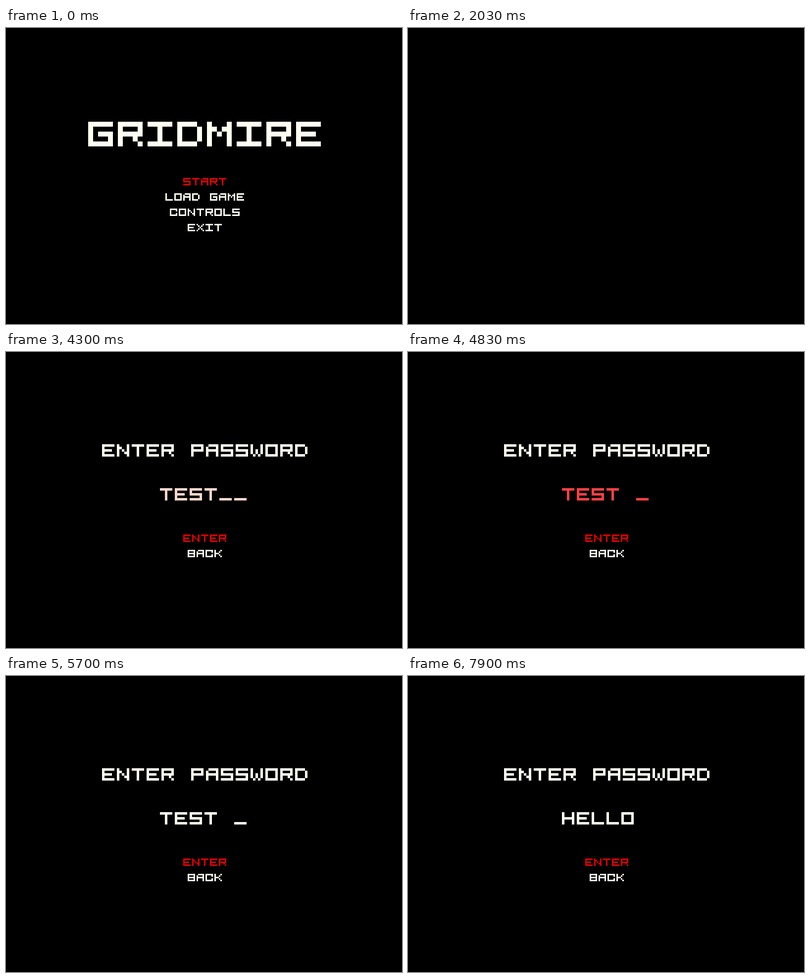
Animation, 800 px wide and 600 px high, one loop 8000 ms. Source, as an HTML page with a canvas:

```html
<!DOCTYPE html>
<html lang="en">
<head>
<meta charset="utf-8">
<title>Game menu</title>
<style>
  html, body { margin: 0; width: 100%; height: 100%; overflow: hidden; background: #000; }
  canvas { display: block; }
</style>
</head>
<body>
<canvas id="stage" width="800" height="600" role="img" aria-label="Game menu, then a password screen"></canvas>
<script>
const LOOP = 8000;
const WHITE = [255, 255, 240], RED = [224, 0, 0], ERROR = [255, 0, 10];
const ctx = document.getElementById('stage').getContext('2d');

// 5 x 5 pixel font, one group per row
const FONT = {
  A: '01111 10001 11111 10001 10001',
  B: '11111 10001 11111 10001 11111',
  C: '11111 10001 10000 10001 11111',
  D: '11110 10001 10001 10001 11110',
  E: '11111 10000 11110 10000 11111',
  G: '11111 10000 10111 10001 11111',
  H: '10001 10001 11111 10001 10001',
  I: '11111 00100 00100 00100 11111',
  K: '10001 10010 11100 10010 10001',
  L: '10000 10000 10000 10000 11111',
  M: '10001 11011 10101 10001 10001',
  N: '10001 11001 10101 10011 10001',
  O: '11111 10001 10001 10001 11111',
  P: '11111 10001 11111 10000 10000',
  R: '11111 10001 11111 10010 10001',
  S: '11111 10000 11111 00001 11111',
  T: '11111 00100 00100 00100 00100',
  W: '10001 10001 10101 10101 01010',
  X: '10001 01010 00100 01010 10001',
  _: '00000 00000 00000 00000 11111'
};

// Password field contents over time
const TYPING = [
  [0, ''], [3200, 'T'], [3330, 'TE'], [3370, 'TES'], [4000, 'TEST'],
  [5870, 'TES'], [6220, 'TE'], [6570, 'T'], [7030, ''],
  [7230, 'H'], [7430, 'HE'], [7530, 'HEL'], [7670, 'HELL'], [7770, 'HELLO']
];
const SLOTS = 6;

const clamp = v => Math.min(1, Math.max(0, v));
const ramp = (t, from, to) => clamp((t - from) / (to - from));
const mix = (a, b, k) => a.map((v, i) => Math.round(v + (b[i] - v) * k));

function write(text, x, y, size, color) {
  ctx.fillStyle = `rgb(${color})`;
  [...text].forEach((ch, n) => {
    if (!FONT[ch]) return;
    FONT[ch].split(' ').forEach((row, r) => {
      [...row].forEach((bit, c) => {
        if (bit === '1') ctx.fillRect(x + (n * 6 + c) * size, y + r * size, size, size);
      });
    });
  });
}

function menu(items, selected, y) {
  items.forEach((item, i) => {
    const x = Math.ceil(401 - (item.length * 18 - 3) / 2);
    write(item, x, y + i * 31, 3, i === selected ? RED : WHITE);
  });
}

function mainScreen(t) {
  ctx.globalAlpha = 1 - ramp(t, 1530, 2030);
  write('GRIDMIRE', 166, 190, 10, WHITE);
  menu(['START', 'LOAD GAME', 'CONTROLS', 'EXIT'], t < 1230 ? 0 : 1, 304);
}

function passwordScreen(t) {
  ctx.globalAlpha = ramp(t, 2060, 2530);
  write('ENTER PASSWORD', 194, 187, 5, WHITE);

  const typed = TYPING.filter(([at]) => at <= t).pop()[1];
  const cursor = Math.floor((t - 200) / 400) % 2 ? ' ' : '_';
  const wrong = ramp(t, 4230, 4680) - ramp(t, 4680, 5280);
  write((typed + cursor).padEnd(SLOTS, '_'), 311, 276, 5, mix(WHITE, ERROR, wrong));

  menu(['ENTER', 'BACK'], 0, 370);
}

function draw(now) {
  const t = now % LOOP;
  ctx.globalAlpha = 1;
  ctx.fillStyle = '#000';
  ctx.fillRect(0, 0, 800, 600);
  if (t < 2030) mainScreen(t);
  else passwordScreen(t);
}

let start;
function tick(now) {
  start ??= now;
  draw(Math.max(0, now - start));
  requestAnimationFrame(tick);
}
draw(0);
requestAnimationFrame(tick);
</script>
</body>
</html>
```
